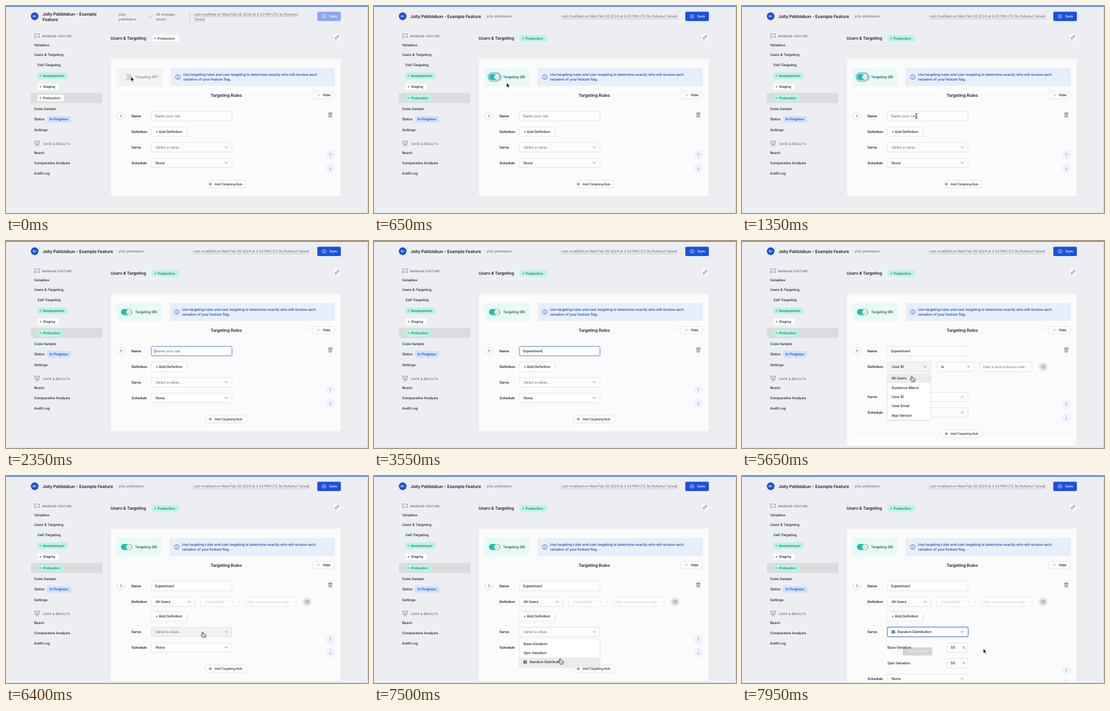
Recreate the animation shown at these times as an HTML page. Size 600 px wide and 344 px high, loop 8000 ms.

```html
<!DOCTYPE html>
<html lang="en">
<head>
<meta charset="utf-8">
<title>Feature targeting</title>
<style>
html, body { margin: 0; width: 100%; height: 100%; overflow: hidden; background: #edeef1; }
svg { display: block; width: 100vw; height: 100vh; font-family: Inter, "Open Sans", sans-serif; text-rendering: geometricPrecision; }
text { white-space: pre; }
</style>
</head>
<body>
<svg id="stage" viewBox="0 0 600 344"></svg>
<script>
const LOOP = 8000, STEP = 50;
const INK = '#202328', GREY = '#666a73', LINE = '#d8d9dd', BLUE = '#1b50e2', FOCUS = '#5482ec', MINT = '#b8f5e5', GREEN = '#1b7464';
const stage = document.getElementById('stage');

// Moments of the interaction, in ms
const AT = { toggle: 300, focus: 1800, type: 2250, add: 4250, fieldOpen: 5250, fieldPick: 5900, serveOpen: 6800, servePick: 7650 };

const pointerKeys = [
  [0, 207, 117.5], [450, 207, 117.5], [1250, 289, 183], [3600, 289, 183], [4100, 285, 209],
  [4450, 285, 209], [4900, 303, 209], [5300, 303, 209], [5650, 283, 229], [5950, 283, 229],
  [6350, 327.5, 263.5], [6950, 327.5, 263.5], [7450, 310, 308], [7750, 310, 308], [7950, 400, 287]
];

const clamp = v => Math.max(0, Math.min(1, v));
const ease = v => v * v * (3 - 2 * v);
const mix = (a, b, k) => a + (b - a) * k;

function pointerAt(t) {
  const i = pointerKeys.findIndex(k => k[0] > t);
  if (i < 0) return pointerKeys[pointerKeys.length - 1].slice(1);
  const [a, b] = [pointerKeys[i - 1], pointerKeys[i]];
  const k = ease((t - a[0]) / (b[0] - a[0]));
  return [mix(a[1], b[1], k), mix(a[2], b[2], k)];
}

// Text is placed by the middle of its capitals; tracking is in em
function text(x, y, str, { size = 5.95, weight = 400, fill = INK, anchor = 'start', track = -0.015 } = {}) {
  const safe = str.replace(/&/g, '&amp;');
  return `<text x="${x}" y="${y + size * 0.364}" font-size="${size}" font-weight="${weight}" fill="${fill}" text-anchor="${anchor}" letter-spacing="${size * track}">${safe}</text>`;
}
const rect = (x, y, w, h, r, fill, stroke = 'none', sw = 0.7) =>
  `<rect x="${x}" y="${y}" width="${w}" height="${h}" rx="${r}" fill="${fill}" stroke="${stroke}" stroke-width="${sw}"/>`;
const circle = (x, y, r, fill, stroke = 'none', sw = 0.7) =>
  `<circle cx="${x}" cy="${y}" r="${r}" fill="${fill}" stroke="${stroke}" stroke-width="${sw}"/>`;
const path = (x, y, d, stroke, sw = 0.8, fill = 'none') =>
  `<path transform="translate(${x} ${y})" d="${d}" fill="${fill}" stroke="${stroke}" stroke-width="${sw}" stroke-linecap="round" stroke-linejoin="round"/>`;
const rule = (x1, x2, y) => rect(x1, y - 0.3, x2 - x1, 0.6, 0, '#f0f0f2');
const chevron = (x, y, color = '#3c4047') => path(x, y, 'M-1.9-.9L0 1L1.9-.9', color, 0.75);
const sliders = (x, y) => path(x, y, 'M-2-2.6V2.6M0-2.6V2.6M2-2.6V2.6M-2.8 1h1.6M-.8-1h1.6M1.2 1h1.6', INK, 0.8);
const label = (y, str) => text(208, y, str, { size: 5.75, weight: 600 });

function pill(x, y, w, name, on) {
  return rect(x, y - 5.4, w, 10.8, 2.2, on ? MINT : '#fff') +
    path(x + 5, y, 'M0-1.3L1.3 0L0 1.3L-1.3 0Z', 'none', 0, on ? '#2f9482' : '#4a4d54') +
    text(x + 9.2, y, name, { size: 5.75, weight: 500, fill: on ? GREEN : INK, track: -0.02 });
}

function select(x, y, w, str, { fill = '#fdfdfe', color = INK, edge = LINE, weight = 500 } = {}) {
  return rect(x, y - 7.8, w, 15.6, 2, fill, edge) +
    text(x + 7, y, str, { fill: color, weight }) + chevron(x + w - 9.5, y, color === INK ? undefined : color);
}

function menu(x, y, w, items, [px, py]) {
  const pitch = 15.3, h = items.length * pitch + 1;
  let out = rect(x - 0.5, y + 0.6, w + 1, h + 0.8, 2, '#00000014') + rect(x, y, w, h, 2, '#fff', '#dfe0e4', 0.6);
  items.forEach((name, i) => {
    const top = y + 0.5 + i * pitch, mid = top + pitch / 2, icon = name === 'Random Distribution';
    if (px > x && px < x + w && py >= top && py < top + pitch) out += rect(x + 0.4, top, w - 0.8, pitch, 1, '#ececee');
    if (icon) out += sliders(x + 9.5, mid);
    out += text(x + (icon ? 17 : 7), mid, name, { weight: 450 });
  });
  return out;
}

function header(on) {
  let out = rect(0, 0, 600, 1.2, 0, '#3d70f2') + circle(47.5, 17, 6.4, BLUE) +
    path(47.5, 17, 'M2.6 0H-2.6M-.5-2.1L-2.6 0L-.5 2.1', '#fff', 0.9);
  const title = { size: 7.2, weight: 600 }, soft = { fill: GREY };
  const under = (x, y, w) => rect(x, y, w, 0.6, 0, '#a9abb2');
  const stamp = 'Last modified on Wed Feb 28 2024 at 4:23 PM UTC by Rohanul';
  if (on) {
    out += text(60.5, 17.2, 'Jolly Pebblebun - Example Feature', title) +
      text(187, 17.2, 'jolly-pebblebun', soft) +
      text(310.3, 17.2, stamp + ' Tanedi', soft) + under(310.3, 20.8, 193);
  } else {
    out += text(60.5, 13, 'Jolly Pebblebun - Example', title) + text(60.5, 22.8, 'Feature', title) +
      text(187, 13.4, 'jolly-', soft) + text(187, 21.8, 'pebblebun', soft) +
      path(240, 17.5, 'M-2.8 .2L-.8 2.2L3-2.4', '#3cc8a6', 0.8) +
      text(248.5, 13.4, 'All changes', soft) + text(248.5, 21.8, 'saved', soft) +
      rect(304.2, 9.5, 0.7, 16.5, 0, '#b4b6bc') +
      text(311.3, 13.4, stamp, soft) + text(311.3, 21.8, 'Tanedi', soft) +
      under(311.3, 17, 172.5) + under(311.3, 25.4, 18.5);
  }
  return out + rect(516, 9.5, 39, 15.4, 2, on ? BLUE : '#8ca8f0') +
    circle(527.3, 17.2, 3, 'none', '#fff', 0.65) + path(527.3, 17.2, 'M-1.2 .1L-.3 1L1.3-.8', '#fff', 0.65) +
    text(535.5, 17.2, 'Save', { size: 5.75, weight: 500, fill: '#fff' });
}

function sidebar(on) {
  const heading = { size: 5, weight: 500, fill: '#5b5f68', track: 0.05 };
  const links = [['Variables', 64.6], ['Users & Targeting', 81], ['Code Sample', 171], ['Status', 188.3],
    ['Settings', 206.3], ['Reach', 243.5], ['Comparative Analysis', 260.5], ['Audit Log', 277.5]];
  return path(47.7, 50, 'M0 4V-3.5C2-4.5 3.5-3 5-3S7-3.5 8.2-3.6L7-1L8.2 2C6 2.6 4.5 1 3 1S1 1.5 0 2', GREY, 0.6) +
    text(60, 49.8, 'MANAGE FEATURE', heading) +
    path(51.5, 228.5, 'M-4.2-3.7H4.2M-3.4-3.7V1.6H3.4V-3.7M0 1.6V3M-2 4.4L0 3L2 4.4M-1.7-.5L-.3.4L1.7-1.8', GREY, 0.6) +
    text(62, 229, 'DATA & RESULTS', heading) +
    rect(41.3, 144.6, 118.4, 16.6, 2, '#dbdcde') +
    links.map(([name, y]) => text(46.4, y, name, { size: 5.9, weight: 500 })).join('') +
    text(52, 98.3, 'Self-Targeting', { size: 5.9, weight: 500 }) +
    pill(52, 115.8, 50, 'Development', true) + pill(52, 134.2, 35, 'Staging', false) +
    pill(52, 153, 44, 'Production', on) +
    rect(68, 182.8, 40, 11, 2.2, '#cfdffb') + text(72.3, 188.3, 'In Progress', { size: 5.8, weight: 500, fill: '#1c40bd' });
}

function toggleBox(t) {
  const on = t >= AT.toggle, k = ease(clamp((t - AT.toggle + 50) / 150)), x = mix(195.7, 203.6, k);
  let out = rect(183.5, 103, on ? 74.3 : 76.5, 30, 2, on ? '#e9f9f5' : '#f2f3f4');
  if (on && t < AT.focus) out += rect(188.9, 111, 21.8, 14, 7, '#d6ecf4', '#3f7fd0', 0.9);
  out += rect(190.4, 112.9, 18.8, 10.2, 5.1, on ? '#20c1a4' : '#d3d4d7') + circle(x, 118, 4.4, '#fff');
  out += on ? path(x, 118, 'M-1.5 0L-.4 1.2L1.6-1.1', '#20a48c', 0.7)
    : path(x, 118, 'M-1.1-1.1L1.1 1.1M1.1-1.1L-1.1 1.1', '#a5a7ad', 0.7);
  return out + text(214, 118, on ? 'Targeting ON' : 'Targeting OFF', { size: 5.9, weight: 500, fill: on ? '#134f45' : '#8b8e95' });
}

function infoBox(on) {
  const x = on ? 271 : 273, ink = '#1f43b4', style = { size: 5.95, weight: 500, fill: ink };
  return rect(x, 103, 545 - x, 30, 2, '#e6effb') + circle(x + 12, 118, 3.9, 'none', ink, 0.7) +
    path(x + 12, 118, 'M0-.2V1.8M0-1.8V-1.7', ink, 0.8) +
    text(x + 20.5, 113.8, 'Use targeting rules and user targeting to determine exactly who will receive each', style) +
    text(x + 20.5, 122.2, 'variation of your feature flag.', style);
}

function nameField(t) {
  const active = t >= AT.focus && t < AT.add;
  const count = Math.floor(clamp((t - AT.type) / 1200) * 10), typed = 'Experiment'.slice(0, count);
  let out = rect(241, 175.2, 133.6, 15.6, 2, '#fdfdfe', active ? FOCUS : LINE, active ? 1 : 0.7);
  const caret = active && (t < AT.type ? (t - AT.focus) % 1000 < 500 : true);
  if (!count) {
    out += text(247, 183, 'Name your rule', { fill: GREY });
    if (caret) out += rect(246.6, 179.6, 0.6, 7, 0, INK);
  } else {
    out += text(247, 183, typed + (caret ? '<tspan font-weight="300" dx="-.5">|</tspan>' : ''), { weight: 450 });
  }
  return out;
}

function definition(t) {
  let out = '';
  if (t >= AT.add) {
    const all = t >= AT.fieldPick, pale = '#c0c2c8', edge = all ? '#e4e5e9' : LINE;
    const hover = t >= 4650 && !all;
    out += select(241, 209, 72, all ? 'All Users' : 'User ID', { fill: hover ? '#f2f3f4' : '#fdfdfe' }) +
      select(323, 209, 62, all ? 'Comparator' : 'is', { color: all ? pale : INK, edge, weight: all ? 400 : 500 }) +
      rect(395, 201.2, 85.5, 15.6, 2, '#fdfdfe', edge) +
      text(399.7, 209, 'Enter a value and press enter...', { size: 5.2, fill: all ? pale : GREY }) +
      circle(499, 209, 7.3, '#e6e7e9') +
      path(499, 209, 'M-3.6 0L-1.6-2.3H3.3V2.3H-1.6ZM-.3-.9L1.5.9M1.5-.9L-.3.9', GREY, 0.6);
  }
  const y = t >= AT.add ? 233.2 : 209;
  return out + rect(241, y - 7.8, 59, 15.6, 2, '#fff', LINE) + text(248, y, '+ Add Definition', { size: 5.9, weight: 500 });
}

function serve(t, y) {
  if (t < AT.servePick) {
    const hover = t >= 6300 && t < AT.serveOpen;
    return select(241, y, 133.6, 'Select a value...', { fill: hover ? '#f1f2f3' : '#fdfdfe', color: GREY, weight: 400 });
  }
  let out = rect(240.8, y - 8, 134.2, 16, 2.2, '#fdfdfe', FOCUS, 1.2) + sliders(250.8, y) +
    text(258, y, 'Random Distribution', { weight: 450 }) + chevron(365.1, y);
  ['Base Variation', 'Spin Variation'].forEach((name, i) => {
    const row = y + 26 * (i + 1);
    out += text(241, row, name, { weight: 500 }) + rect(340, row - 7.8, 34.4, 15.6, 2, '#fdfdfe', LINE) +
      text(346, row, '50', { weight: 500 }) + text(365, row, '%', { fill: GREY });
  });
  return out;
}

function orderButton(y, dir) {
  return circle(537.5, y, 6.8, '#f1f5fd', '#dbe4f8', 0.7) +
    path(537.5, y, `M0 ${3 * dir}V${-3 * dir}M-2.2 ${-0.8 * dir}L0 ${-3 * dir}L2.2 ${-0.8 * dir}`, '#8facf0', 0.7);
}

function tooltip(t) {
  const shown = clamp((t - AT.servePick) / 100) * clamp((8020 - t) / 180);
  if (!shown) return '';
  return `<g opacity="${shown}">` + rect(266.2, 284.8, 49.2, 13.4, 2, '#85878cdd') +
    path(290.8, 298.2, 'M-2.2 0H2.2L0 2.3Z', 'none', 0, '#85878cdd') +
    text(290.8, 291.5, 'Spin Variation', { size: 5.2, fill: '#fff', anchor: 'middle' }) + '</g>';
}

function pointer(t, [x, y]) {
  if (t >= AT.type - 50 && t < 3600) return '';
  if ((t >= 1150 && t < AT.type) || (t >= 3600 && t < 3750)) {
    const beam = 'M-1.5-4.2Q0-4.2 0-3Q0-4.2 1.5-4.2M0-3V3M-1.5 4.2Q0 4.2 0 3Q0 4.2 1.5 4.2M-.9.9H.9';
    return path(x, y, beam, '#fff', 1.7) + path(x, y, beam, '#111', 0.8);
  }
  if (t >= 4000 && t < AT.servePick) {
    return path(x, y, 'M-2.5.8V-3.6Q-2.4-4.6-1.6-4.6T-.7-3.6V-.9Q.2-1.7 1-.7Q1.9-1.3 2.5-.3Q3.8-.7 3.9.7V2.2Q3.8 3.6 2.9 4.7H-1.5L-4 1.6Q-4.7.6-3.8.2Q-3.1 0-2.5.8Z', '#111', 0.75, '#fff') +
      path(x, y, 'M-.4 1.4V3.2M1 1.4V3.2M2.4 1.4V3.2', '#111', 0.45);
  }
  return path(x, y, 'M0 0V7.6L1.8 6L3 8.7L4.3 8.1L3.1 5.5H5.4Z', '#fff', 0.6, '#111');
}

function card(t, at) {
  const on = t >= AT.toggle, d = t >= AT.add ? 24.3 : 0, s = d + (t >= AT.servePick ? 51.8 : 0);
  const serveY = 234.8 + d, schedY = 260.7 + s, endY = 296 + s;
  let out = text(173.3, 53.8, 'Users & Targeting', { size: 7.05, weight: 600 }) + pill(242, 53.7, 45, 'Production', on) +
    rect(173.5, 67.3, 381.5, 0.6, 0, '#e3e4e7') +
    circle(548.5, 52, 6.9, '#fbfbfc', '#e2e3e6', 0.7) +
    path(548.5, 52, 'M-.6.6L.7-.7M-.5-1.6L.8-2.9A1.5 1.5 0 0 1 2.9-.8L1.6.5M.5 1.6L-.8 2.9A1.5 1.5 0 0 1-2.9.8L-1.6-.5', INK, 0.65);
  out += rect(173, 88, 382.4, 230 + s, 3.4, '#0000000c') + rect(173.5, 87.5, 381.5, 229.3 + s, 3, '#fbfbfc');
  out += toggleBox(t) + infoBox(on);
  out += rule(183.5, 333, 148) + rule(397, 507, 148) +
    text(365, 147.9, 'Targeting Rules', { size: 7.15, weight: 600, anchor: 'middle' }) +
    rect(507.3, 141.9, 37.7, 12.2, 6.1, '#fff', LINE) + path(518, 148, 'M-2.2 0H2.2', GREY, 0.6) +
    text(525, 148, 'Hide', { weight: 500 });
  out += circle(190.4, 183, 6.2, '#fff', '#d0d1d6') + text(190.4, 183, '1', { weight: 500, anchor: 'middle' }) +
    path(537.5, 181, 'M-3.3-2.6H3.3M-1.2-2.7V-3.7H1.2V-2.7M-2.6-2.6L-2.2 3.7H2.2L2.6-2.6M-.9-.8V2M.9-.8V2', '#3c4047', 0.6);
  out += label(183, 'Name') + nameField(t) + label(209, 'Definition') + definition(t) +
    label(serveY, 'Serve') + serve(t, serveY) +
    label(schedY, 'Schedule') + select(241, schedY, 133.6, 'None') +
    orderButton(247.6 + s, 1) + orderButton(269.4 + s, -1);
  out += rule(183.5, 330, endY) + rule(398, 545, endY) + rect(330, endY - 6.4, 68.4, 12.8, 6.4, '#fff', LINE) +
    path(338.5, endY, 'M-2.1 0H2.1M0-2.1V2.1', INK, 0.7) + text(346, endY, 'Add Targeting Rule', { size: 5.2, weight: 500 });
  if (t >= AT.fieldOpen && t < AT.fieldPick)
    out += menu(241, 220, 72, ['All Users', 'Audience Match', 'User ID', 'User Email', 'App Version'], at);
  if (t >= AT.serveOpen && t < AT.servePick)
    out += menu(241, 270.3, 133.6, ['Base Variation', 'Spin Variation', 'Random Distribution'], at);
  return out + tooltip(t);
}

const windowEdge = () => rect(599.2, 0, 0.8, 344, 0, '#c9cacd') + rect(0, 343.4, 600, 0.6, 0, '#d6d7da');

function draw(t) {
  const at = pointerAt(t), on = t >= AT.toggle;
  stage.innerHTML = rect(0, 0, 600, 344, 0, '#edeef1') + header(on) + sidebar(on) + card(t, at) + windowEdge() + pointer(t, at);
}

let start = null, last = -1;
function tick(now) {
  if (start === null) start = now;
  const t = Math.floor(((now - start) % LOOP) / STEP) * STEP;
  if (t !== last) draw(last = t);
  requestAnimationFrame(tick);
}
draw(0);
requestAnimationFrame(tick);
</script>
</body>
</html>
```
